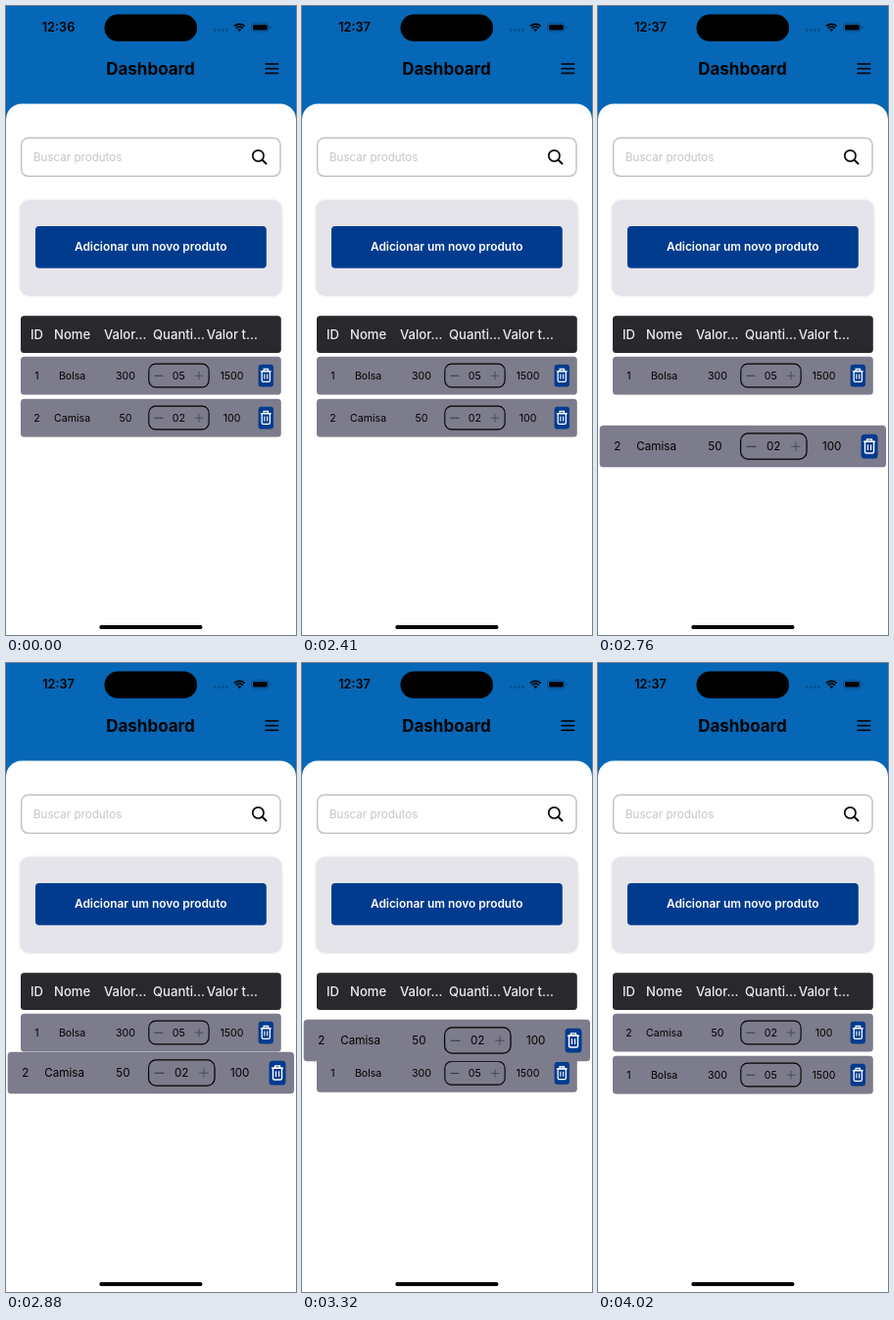
Write an HTML page with a canvas that moves like this. It is 296x640 px and loops after 5550 ms.

```html
<!DOCTYPE html>
<html lang="pt">
<head>
<meta charset="utf-8">
<title>Dashboard</title>
<style>
html, body { margin: 0; width: 100%; height: 100%; overflow: hidden; background: #fff; }
canvas { display: block; width: 296px; height: 640px; }
</style>
</head>
<body>
<canvas id="stage"></canvas>
<script>
const W = 296, H = 640, LOOP = 5550;
const BLUE = '#0567b5', NAVY = '#003b8e', ROW = '#7c7c8c';
const canvas = document.getElementById('stage');
const ctx = canvas.getContext('2d');
const dpr = window.devicePixelRatio || 1;
canvas.width = W * dpr;
canvas.height = H * dpr;

// The screen refreshes only at these moments (ms).
const STEPS = [0, 870, 2410, 2520, 2640, 2760, 2880, 3000, 3110, 3220,
  3320, 3430, 3540, 3660, 3760, 3860];

// Keyframes: [time, value]
const DRAG_Y = [[2410, 419], [2520, 424], [2640, 437], [2760, 448], [2880, 417],
  [3000, 402], [3110, 393], [3320, 384], [3540, 381], [3660, 380], [3860, 376]];
const DRAG_SCALE = [[2410, 1], [2640, 1.1], [3600, 1.1], [3860, 1]];

function track(keys, t) {
  if (t <= keys[0][0]) return keys[0][1];
  for (let i = 1; i < keys.length; i++) {
    const [t0, a] = keys[i - 1], [t1, b] = keys[i];
    if (t <= t1) return a + (b - a) * (t - t0) / (t1 - t0);
  }
  return keys[keys.length - 1][1];
}

function easeInOut(u) {
  u = Math.min(1, Math.max(0, u));
  return (1 - Math.cos(Math.PI * u)) / 2;
}

function box(x, y, w, h, r, fill) {
  ctx.beginPath();
  ctx.roundRect(x, y, w, h, r);
  ctx.fillStyle = fill;
  ctx.fill();
}

function frame(x, y, w, h, r, color, width) {
  ctx.beginPath();
  ctx.roundRect(x, y, w, h, r);
  ctx.strokeStyle = color;
  ctx.lineWidth = width;
  ctx.stroke();
}

function line(x1, y1, x2, y2, color, width) {
  ctx.beginPath();
  ctx.moveTo(x1, y1);
  ctx.lineTo(x2, y2);
  ctx.strokeStyle = color;
  ctx.lineWidth = width;
  ctx.stroke();
}

function text(str, x, y, size, weight, color, align = 'center') {
  ctx.font = `${weight} ${size}px Inter, "Liberation Sans", sans-serif`;
  ctx.textAlign = align;
  ctx.fillStyle = color;
  ctx.fillText(str, x, y);
}

function wifi(x, y) {
  ctx.strokeStyle = '#000';
  ctx.lineWidth = 1.8;
  for (const r of [7.6, 4.9]) {
    ctx.beginPath();
    ctx.arc(x, y, r, -Math.PI * 0.75, -Math.PI * 0.25);
    ctx.stroke();
  }
  ctx.beginPath();
  ctx.moveTo(x, y);
  ctx.arc(x, y, 2.8, -Math.PI * 0.75, -Math.PI * 0.25);
  ctx.fillStyle = '#000';
  ctx.fill();
}

function statusBar(clock) {
  text(clock, 53.5, 26.4, 12.7, 600, '#000');
  box(100.5, 8.5, 94.5, 27.5, 13.75, '#000');
  for (let i = 0; i < 4; i++) box(211.5 + i * 4.3, 23.3, 2.6, 2.6, 1, '#07508c');
  wifi(238.3, 26);
  frame(250.5, 17.5, 18, 8.5, 2.8, '#07508c', 0.9);
  box(252, 19, 15, 5.5, 1.5, '#000');
  box(269.8, 20.2, 1.2, 3, 0.6, '#07508c');
}

function header(clock) {
  ctx.fillStyle = BLUE;
  ctx.fillRect(0, 0, W, 130);
  box(0, 99.5, W, H, [16, 16, 0, 0], '#fff');
  statusBar(clock);
  text('Dashboard', 147.5, 69.8, 17, 700, '#000');
  for (const y of [59, 63.7, 68.4]) line(264.5, y, 278.3, y, '#000', 1.6);
}

function search() {
  frame(15.7, 134.2, 264.3, 39, 7, '#c3c3c3', 1.5);
  text('Buscar produtos', 28, 158, 11.6, 400, '#c6c6ca', 'left');
  ctx.beginPath();
  ctx.arc(257.4, 152.4, 5.6, 0, Math.PI * 2);
  ctx.strokeStyle = '#000';
  ctx.lineWidth = 1.7;
  ctx.stroke();
  line(261.5, 156.5, 266, 161, '#000', 1.8);
}

function addCard() {
  ctx.save();
  ctx.shadowColor = 'rgba(70, 70, 90, 0.3)';
  ctx.shadowBlur = 3 * dpr;
  box(14.8, 198, 266.2, 96.5, 9, '#e5e4ea');
  ctx.restore();
  box(30, 224, 235.8, 42.8, 4, NAVY);
  text('Adicionar um novo produto', 147.7, 249.3, 11.9, 600, '#fff');
}

function tableHead() {
  box(15, 315.3, 265.8, 37.7, 3.5, '#28282d');
  const heads = [['ID', 25], ['Nome', 49], ['Valor…', 100], ['Quanti…', 150], ['Valor t…', 204.8]];
  for (const [label, x] of heads) text(label, x, 339, 13.1, 500, '#ebebef', 'left');
}

function trash(x) {
  box(x - 7.7, -11.2, 15.4, 22.6, 3.2, NAVY);
  line(x - 5.4, -4.3, x + 5.4, -4.3, '#fff', 1.3);
  ctx.beginPath();
  ctx.moveTo(x - 2.2, -4.3);
  ctx.lineTo(x - 2.2, -6.5);
  ctx.lineTo(x + 2.2, -6.5);
  ctx.lineTo(x + 2.2, -4.3);
  ctx.stroke();
  frame(x - 4.1, -4.3, 8.2, 10.7, [0, 0, 1.4, 1.4], '#fff', 1.3);
  for (const d of [-1.4, 1.4]) line(x + d, -1.6, x + d, 3.6, '#fff', 1.1);
}

function row(item, y, scale = 1) {
  ctx.save();
  ctx.translate(148, y);
  ctx.scale(scale, scale);
  ctx.translate(-148, 0);
  box(15, -19.3, 265.8, 38.7, 3.5, ROW);
  const cells = [[item.id, 31.5], [item.name, 67.6], [item.price, 122],
    [item.qty, 176.3], [item.total, 230.5]];
  for (const [value, x] of cells) text(value, x, 3.9, 10.6, 400, '#000');
  frame(145.8, -11.9, 61.3, 23.8, 7, '#000', 1.1);
  line(151.3, 0.2, 160.3, 0.2, '#26262c', 0.8);
  line(192.7, 0.2, 201.3, 0.2, '#3c3c46', 0.7);
  line(197, -4.1, 197, 4.5, '#3c3c46', 0.7);
  trash(265.3);
  ctx.restore();
}

const bag = { id: '1', name: 'Bolsa', price: '300', qty: '05', total: '1500' };
const shirt = { id: '2', name: 'Camisa', price: '50', qty: '02', total: '100' };

function draw(t) {
  ctx.setTransform(dpr, 0, 0, dpr, 0, 0);
  ctx.fillStyle = '#fff';
  ctx.fillRect(0, 0, W, H);
  header(t < 870 ? '12:36' : '12:37');
  search();
  addCard();
  tableHead();
  row(bag, 376 + 43 * easeInOut((t - 3069) / 288));
  row(shirt, track(DRAG_Y, t), track(DRAG_SCALE, t));
  box(95.3, 630, 105.2, 4, 2, '#000');
}

const start = performance.now();
function tick() {
  const t = (performance.now() - start) % LOOP;
  draw(STEPS.filter(s => s <= t).pop());
  requestAnimationFrame(tick);
}
tick();
</script>
</body>
</html>
```
